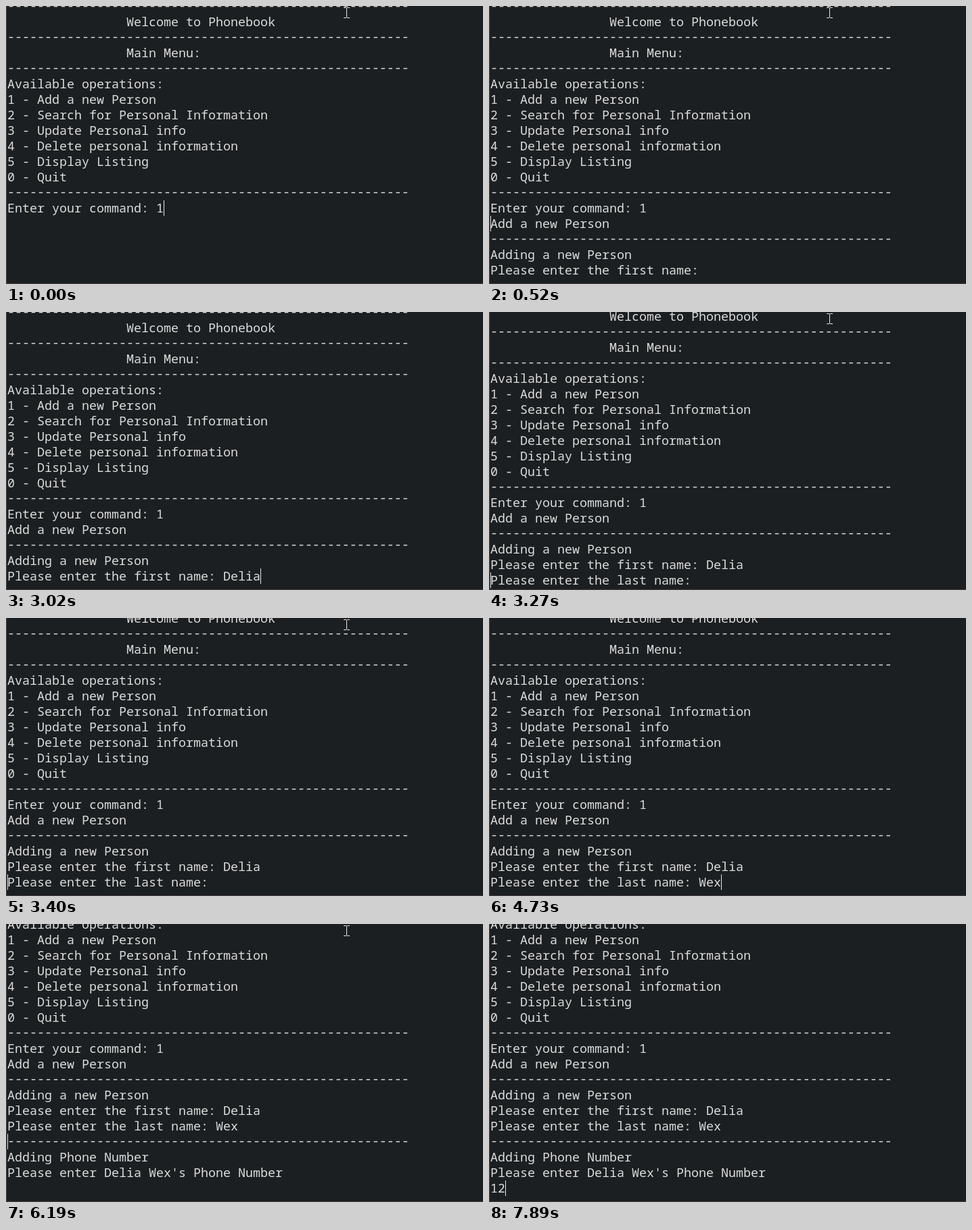
An HTML page with a canvas that plays this animation: 705 px wide and 412 px high, repeating every 8 s.

```html
<!DOCTYPE html>
<html lang="en">
<head>
<meta charset="utf-8">
<title>Phonebook terminal</title>
<style>
  html, body { margin: 0; width: 100%; height: 100%; overflow: hidden; background: #1b1f22; }
  canvas { display: block; }
</style>
</head>
<body>
<canvas id="stage" width="705" height="412"></canvas>
<script>
const ctx = document.getElementById('stage').getContext('2d');
const LOOP = 8000, CELL = 11, LINE = 23, LEFT = 2, ASCENT = 18;
const RULE = '-'.repeat(54);
const INDENT = ' '.repeat(16);
const FIRST = 'Delia', LAST = 'Wex';

const menu = [
  RULE,
  INDENT + 'Welcome to Phonebook',
  RULE,
  INDENT + 'Main Menu:',
  RULE,
  'Available operations:',
  '1 - Add a new Person',
  '2 - Search for Personal Information',
  '3 - Update Personal info',
  '4 - Delete personal information',
  '5 - Display Listing',
  '0 - Quit',
  RULE,
  'Enter your command: 1'
];
const askFirst = ['Add a new Person', RULE, 'Adding a new Person', 'Please enter the first name: '];
const askLast = 'Please enter the last name: ';
const askPhone = [RULE, 'Adding Phone Number', `Please enter ${FIRST} ${LAST}'s Phone Number`];

// Key times for each answer; the n-th time adds the n-th character.
const firstKeys = [2350, 2600, 2750, 2870, 3020];
const lastKeys = [4340, 4610, 4730];
const phoneKeys = [7770, 7890];

// [time, y of the first row]
const scroll = [[0, -11], [3270, -28], [3400, -34], [5040, -51], [5170, -126]];

// [time, row] of the caret while it waits at the left edge
const waits = [[400, 14], [3270, 18], [5040, 19]];
const blinks = [1050, 1580, 2060, 3930, 5680, 6190, 6780, 7310];

const typed = (text, keys, t) => text.slice(0, keys.filter(k => k <= t).length);
const latest = (steps, t) => steps.filter(([at]) => at <= t).pop();

function screenRows(t) {
  const rows = [...menu];
  if (t >= 520) {
    rows.push(...askFirst);
    rows[17] += typed(FIRST, firstKeys, t);
  }
  if (t >= 3270) rows.push(askLast + typed(LAST, lastKeys, t));
  if (t >= 5170) rows.push(...askPhone, typed('12', phoneKeys, t));
  return rows;
}

function caretAt(t, rows) {
  const isTyping = t < 400 ||
    [[firstKeys, 3270], [lastKeys, 5040], [phoneKeys, LOOP]]
      .some(([keys, end]) => t >= keys[0] && t < end);
  if (isTyping) {
    const row = rows.length - 1;
    return { row, col: rows[row].length };
  }
  const [start, row] = latest(waits, t);
  const toggles = blinks.filter(b => b > start && b <= t).length;
  return toggles % 2 ? null : { row, col: 0 };
}

function pointerVisible(t) {
  return t < 400 || (t >= 520 && t < 2350) || (t >= 3270 && t < 4340) || (t >= 5170 && t < 7770);
}

function drawPointer(x, y) {
  const bars = [[x, y + 1, 1, 14], [x - 4, y, 4, 1], [x + 1, y, 4, 1],
                [x - 4, y + 15, 4, 1], [x + 1, y + 15, 4, 1]];
  ctx.fillStyle = '#e6e6e6';
  bars.forEach(bar => ctx.fillRect(...bar));
}

function draw(t) {
  const rows = screenRows(t);
  const top = latest(scroll, t)[1];

  ctx.fillStyle = '#1b1f22';
  ctx.fillRect(0, 0, 705, 412);

  ctx.font = `${CELL / 0.6}px "Noto Sans Mono", monospace`;
  ctx.textBaseline = 'alphabetic';
  ctx.fillStyle = '#dcdcda';
  rows.forEach((text, i) => {
    const lift = text === RULE ? 1 : 0;
    ctx.fillText(text, LEFT, top + i * LINE + ASCENT - lift);
  });

  const caret = caretAt(t, rows);
  if (caret) {
    ctx.fillStyle = '#e6e6e6';
    ctx.fillRect(LEFT + caret.col * CELL, top + caret.row * LINE, 1, LINE);
  }
  if (pointerVisible(t)) drawPointer(503, 2);

  ctx.fillStyle = '#4b4f52';
  ctx.fillRect(0, 0, 1, 412);
  ctx.fillStyle = '#463c3e';
  ctx.fillRect(0, 411, 705, 1);
}

const begin = performance.now();
function tick() {
  draw((performance.now() - begin) % LOOP);
  requestAnimationFrame(tick);
}
tick();
</script>
</body>
</html>
```
